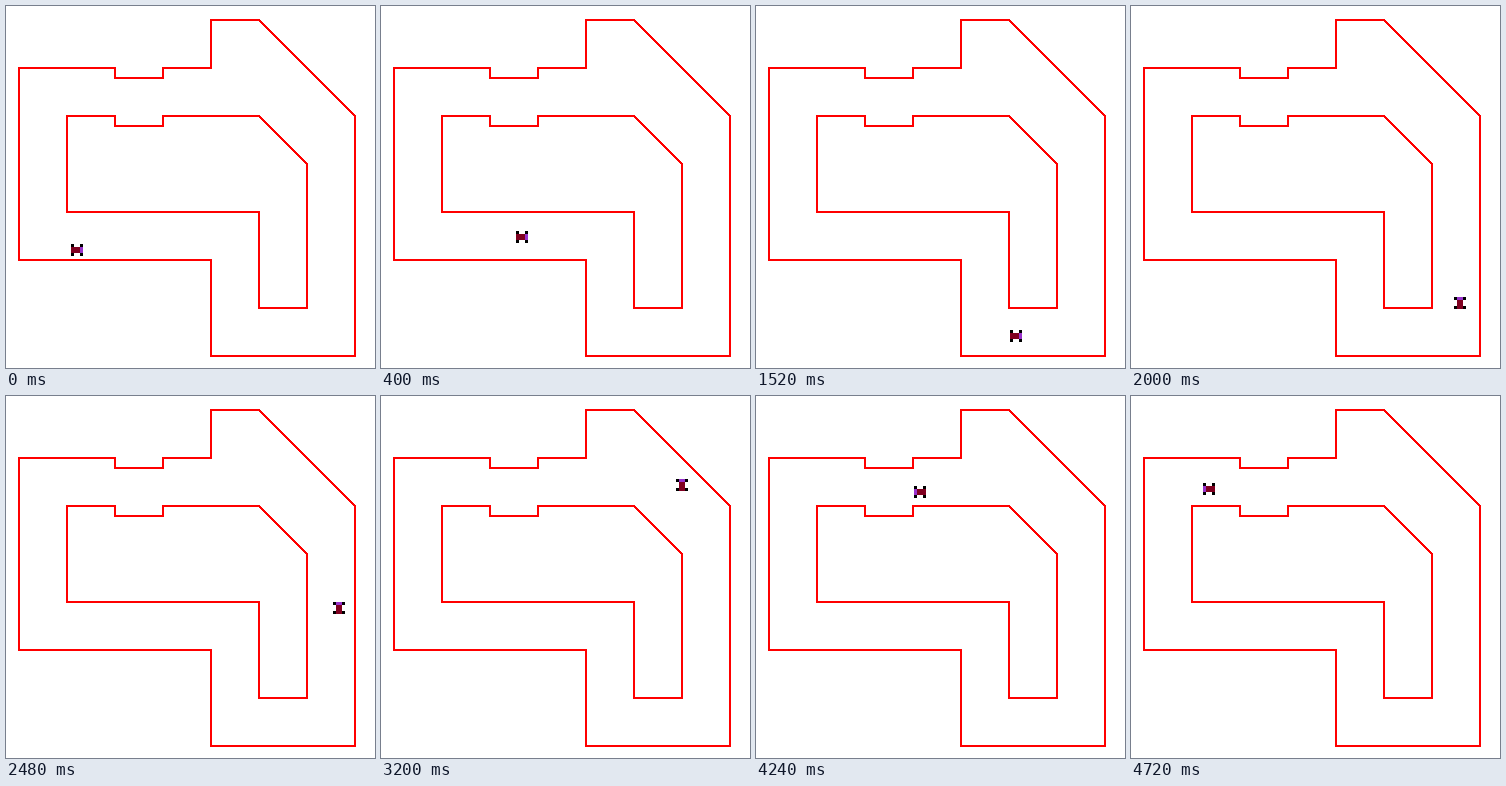
These frames come from a looping animation (369x362 px, 4.8 s). An HTML page:

```html
<!DOCTYPE html>
<html lang="en">
<head>
<meta charset="utf-8">
<title>Race track</title>
<style>
  html, body { margin: 0; width: 100%; height: 100%; overflow: hidden; background: #fff; }
  svg { display: block; width: 369px; height: 362px; shape-rendering: crispEdges; }
  .track { fill: none; stroke: #f00; stroke-width: 2; }
</style>
</head>
<body>
<svg viewBox="0 0 369 362">
  <defs>
    <path id="route" d="M71 244L170 225Q198 219 226 228L246 322Q248 331 259 330L287 332
      C322 332 333 302 333 258V215Q333 186 329 157Q322 120 304 92L285 70
      Q262 43 239 37Q218 38 214 68C206 84 180 102 122 96L78 93"/>
  </defs>
  <path class="track" d="M13 62H109V72H157V62H205V14H253L349 110V350H205V254H13Z"/>
  <path class="track" d="M61 110H109V120H157V110H253L301 158V302H253V206H61Z"/>
  <g id="car">
    <path d="M-6-6h3v12h-3zM3-6h3v12h-3z"/>
    <path fill="#800020" d="M-6-3h9v6h-9z"/>
    <path fill="#9932cc" d="M3-3h3v6h-3z"/>
  </g>
</svg>
<script>
const STEP = 80, STEPS = 60;
const route = document.getElementById('route');
const car = document.getElementById('car');

// Constant speed: one equal stretch of the route per step
const stride = route.getTotalLength() / (STEPS - 1);
const position = n => route.getPointAtLength(n * stride);

// The car only faces along the axes
function heading(n) {
  const from = position(Math.max(n - 1, 0)), to = position(Math.max(n, 1));
  const dx = to.x - from.x, dy = to.y - from.y;
  if (Math.abs(dx) >= Math.abs(dy)) return dx < 0 ? 180 : 0;
  return dy < 0 ? -90 : 90;
}

function draw(time) {
  const n = Math.floor(time / STEP) % STEPS;
  const { x, y } = position(n);
  car.setAttribute('transform',
    `translate(${Math.round(x)} ${Math.round(y)}) rotate(${heading(n)})`);
}

const start = performance.now();
function tick() {
  draw(performance.now() - start);
  requestAnimationFrame(tick);
}
tick();
</script>
</body>
</html>
```
